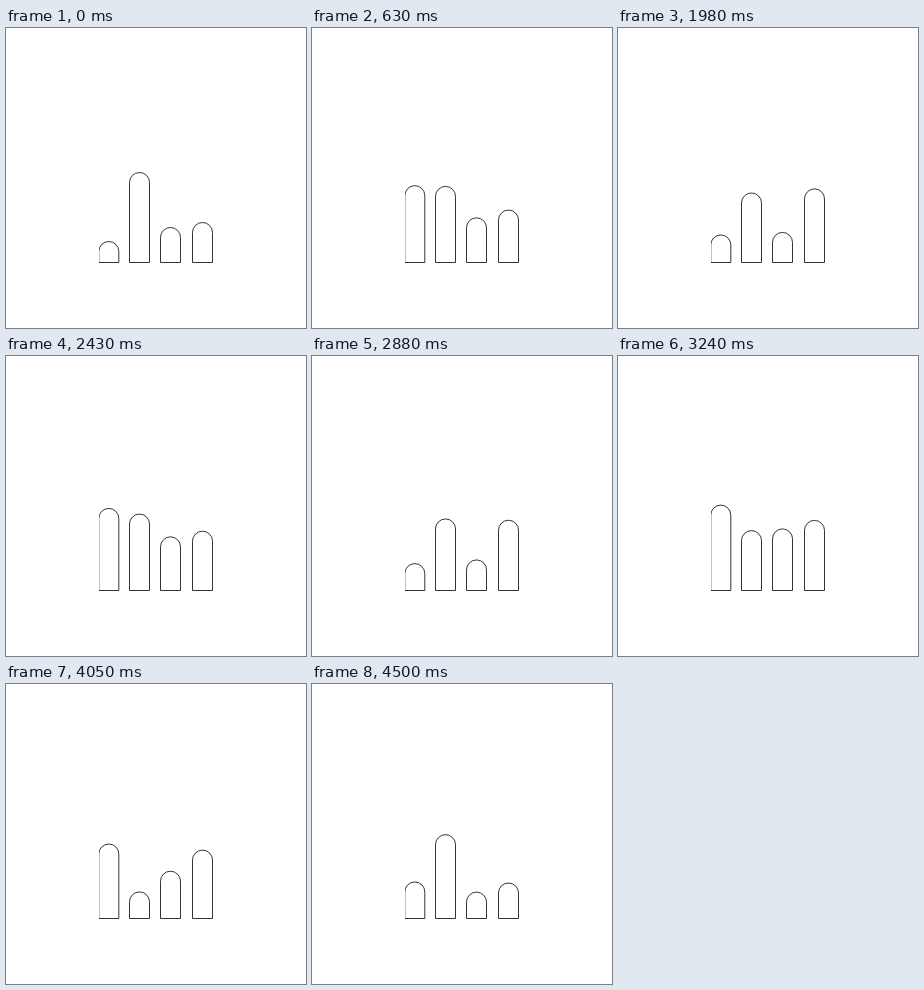
An HTML page for the animation above (4.53 s loop, 300 by 300 pixels).

```html
<!DOCTYPE html>
<html lang="en">
<head>
<meta charset="utf-8">
<title>Equalizer bars</title>
<style>
  html, body { margin: 0; width: 100%; height: 100%; overflow: hidden; background: #fff; }
  svg { display: block; width: 100%; height: 100%; clip-path: inset(0 0 0 31%); }
  path { fill: none; stroke: #000; stroke-width: .8; }
</style>
</head>
<body>
<svg viewBox="0 0 300 300"></svg>
<script>
const LOOP = 4530, STEP = 30, CYCLE = 915;
const BASE = 234.5, WIDTH = 20, RADIUS = WIDTH / 2;

// Heights each bar passes through, evenly spaced over one cycle
const bars = [
  { x: 92.8, levels: [22, 30, 73, 92, 60] },
  { x: 123.5, levels: [91, 66, 20, 78, 76] },
  { x: 154.5, levels: [36, 30, 45, 70, 15] },
  { x: 186.5, levels: [41, 82, 69, 72, 30] }
];

const svg = document.querySelector('svg');
for (const bar of bars) {
  bar.path = document.createElementNS(svg.namespaceURI, 'path');
  svg.append(bar.path);
}

function heightAt(levels, time) {
  const position = (time % CYCLE) / CYCLE * levels.length;
  const i = Math.floor(position);
  const from = levels[i], to = levels[(i + 1) % levels.length];
  return from + (to - from) * (position - i);
}

function draw(now) {
  const time = Math.floor((now % LOOP) / STEP) * STEP;
  for (const { x, levels, path } of bars) {
    const shoulder = BASE + 1 - heightAt(levels, time) + RADIUS;
    path.setAttribute('d',
      `M${x} ${BASE}V${shoulder}a${RADIUS} ${RADIUS} 0 0 1 ${WIDTH} 0V${BASE}Z`);
  }
}

const start = performance.now();
function tick() {
  draw(performance.now() - start);
  requestAnimationFrame(tick);
}
tick();
</script>
</body>
</html>
```
